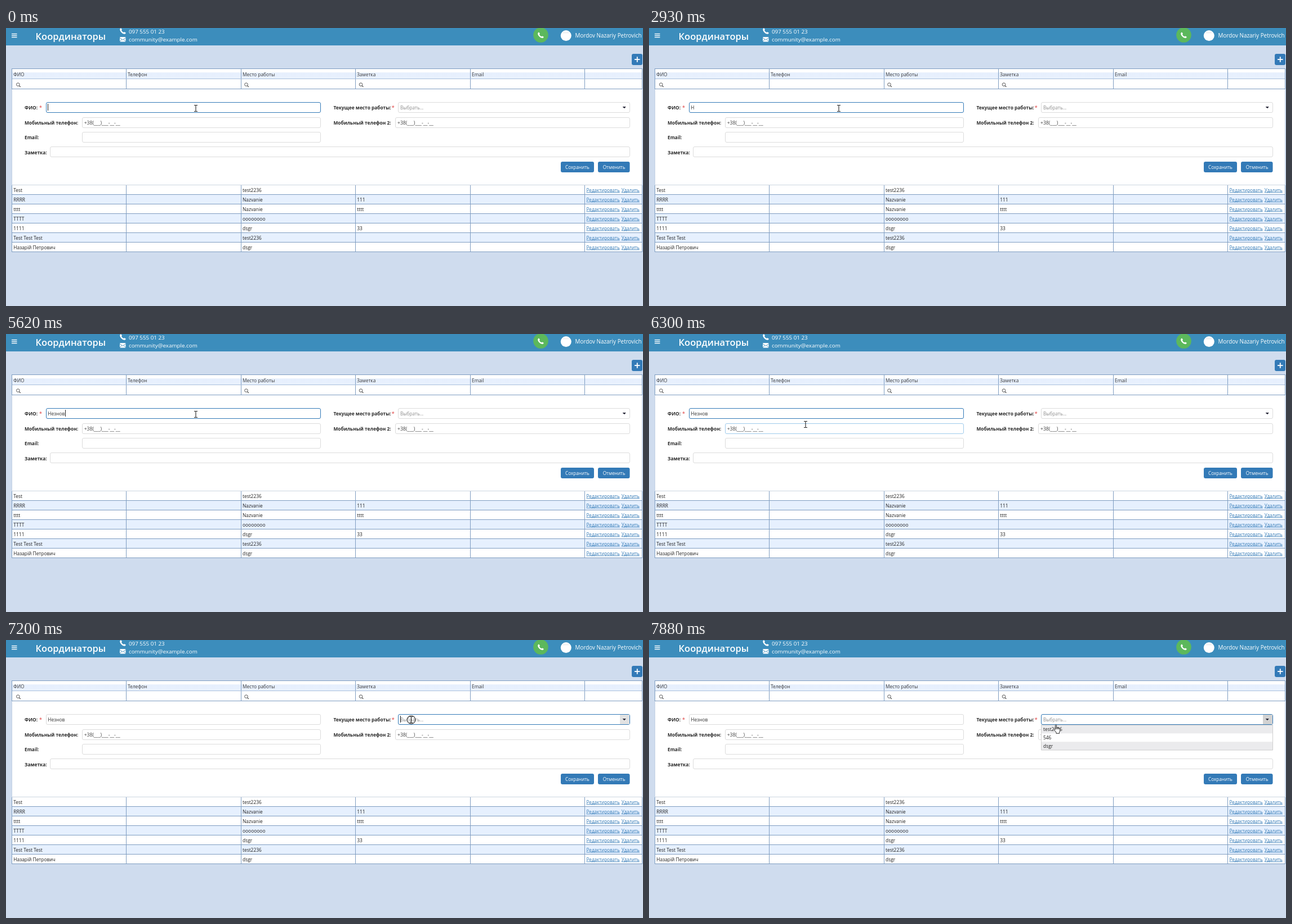
Animation, 1131 px wide and 495 px high, one loop 8 s. Source, as an HTML page:

```html
<!DOCTYPE html>
<html lang="ru">
<head>
<meta charset="utf-8">
<style>
html, body { margin: 0; width: 100%; height: 100%; overflow: hidden; background: #cfdcee; }
svg { display: block; width: 1131px; height: 495px; }
text { font-family: "Open Sans", "Noto Sans", sans-serif; white-space: pre; }
</style>
</head>
<body>
<svg id="stage" viewBox="0 0 1131 495">
  <defs>
    <linearGradient id="head" x2="0" y2="1">
      <stop offset=".3" stop-color="#fff"/><stop offset=".42" stop-color="#e6effd"/>
      <stop offset="1" stop-color="#e9f1fe"/>
    </linearGradient>
    <path id="phone" d="M2.2.3L4 3L2.9 4.2Q4 6.6 6.8 8L8 6.9L10.8 8.5Q10.5 10.8 8.3 10.8Q5 10.6 2.4 7.4Q-.4 4 .4 1.6Q.8.6 2.2.3Z" fill="#fff"/>
    <path id="beam" d="M-3-5.5H-.8L0-5L.8-5.5H3M0-5V5M-3 5.5H-.8L0 5L.8 5.5H3" fill="none" stroke="#222" stroke-width="1.1"/>
    <path id="hand" d="M3 1.5Q4 0 5 1.5V6.2Q6 5.3 7 6.4Q8 5.8 9 7Q10.4 6.4 11.2 8V11.5Q11 13 10 14.5V16.3H4.5V14.5L1 10.2Q-.2 8.6 1 8.2Q2 8 3 9.3ZM5 6V9M7 6.5V9M9 7V9" fill="#fff" stroke="#111" stroke-width=".9"/>
  </defs>
  <g id="page"></g>
  <g id="live"></g>
</svg>
<script>
const LINE = '#7f9dc1', BLUE = '#337ab7', HOVER = '#9fcbec', IDLE = '#dcdcdc';
const NAME = 'Незнов';
const COLS = [10.5, 213.5, 417.5, 620.5, 824.5, 1027.5, 1129.5];

const rect = (x, y, w, h, fill, more = '') =>
  `<rect x="${x}" y="${y}" width="${w}" height="${h}" fill="${fill}" ${more}/>`;
const text = (x, y, s, fill = '#222', size = 8.4, more = '') =>
  `<text x="${x}" y="${y}" fill="${fill}" font-size="${size}" ${more}>${s}</text>`;
const line = (x1, y1, x2, y2, color = LINE, w = 1) =>
  `<path d="M${x1} ${y1}L${x2} ${y2}" stroke="${color}" stroke-width="${w}"/>`;
const use = (id, x, y) => `<use href="#${id}" x="${x}" y="${y}"/>`;
const field = (x, y, right, color = IDLE) =>
  rect(x + .5, y + .5, right - x - 1, 18, '#fff', `rx="2.5" stroke="${color}"`);
const label = (y, s, x = 33) => text(x, y, s, '#2a2a2a', 8.35, 'font-weight="700"');
const star = x => text(x, 145, '*', '#d33', 9);
const button = (x, w, s, tx) =>
  rect(x, 238, w, 19, BLUE, 'rx="3"') + text(tx, 251, s, '#fff', 8.2);
const caret = x => rect(x, 135, 1, 12, '#222');

function topBar() {
  let s = rect(0, 0, 1131, 31, '#3c8dbc');
  for (const y of [10.5, 13.5, 16.5]) s += line(10, y, 19.5, y, '#fff', 1.4);
  s += text(52.5, 20.5, 'Координаторы', '#fff', 16.5, 'font-weight="600"');
  s += use('phone', 202, 0) + text(218, 9.7, '097 555 01 23', '#fff', 9.8);
  s += rect(202, 16, 10.5, 8.5, '#fff', 'rx="1"') +
    '<path d="M202 17.5L207.2 21.3L212.5 17.5M202 24L205.5 20.5M212.5 24L209 20.5" fill="none" stroke="#3c8dbc" stroke-width=".9"/>';
  s += text(218, 24, 'community@example.com', '#fff', 9.8);
  s += '<circle cx="949.5" cy="12.5" r="13.3" fill="#5cb85c"/>' + use('phone', 944, 7.3);
  s += '<circle cx="994.3" cy="13.6" r="9.5" fill="#fff"/>' + line(989, 8.5, 999, 8.5, '#ddd', .8);
  s += text(1010.5, 17.2, 'Mordov Nazariy Petrovich', '#fff', 9.9);
  return s + rect(1111, 46, 19, 20, BLUE, 'rx="3"') +
    line(1116, 56, 1125.5, 56, '#fff', 1.8) + line(1120.75, 51.2, 1120.75, 60.8, '#fff', 1.8);
}

function table() {
  let s = rect(10.5, 72.5, 1119, 326, '#fff') + rect(10.5, 73, 1119, 17, 'url(#head)');
  ['ФИО', 'Телефон', 'Место работы', 'Заметка', 'Email'].forEach((h, i) =>
    s += text(COLS[i] + 2.5, 85.5, h, '#3a3a3a'));
  for (const x of [21.3, 426.5, 630])
    s += `<circle cx="${x}" cy="100.6" r="2.8" fill="none" stroke="#555"/>` +
      line(x + 2, 102.6, x + 4.4, 105, '#555', 1.3);
  const rows = [
    ['Test', 'test2236', ''], ['RRRR', 'Nazvanie', '111'], ['tttt', 'Nazvanie', 'tttt'],
    ['TTTT', 'oooooooo', ''], ['1111', 'dsgr', '33'], ['Test Test Test', 'test2236', ''],
    ['Назарій Петрович', 'dsgr', '']
  ];
  rows.forEach(([name, place, note], i) => {
    const y = 279.5 + i * 17, base = y + 12;
    const link = 'text-decoration="underline"';
    if (i % 2) s += rect(11, y, 1119, 17, '#e6f0fe');
    s += text(13.3, base, name) + text(420, base, place) + text(623.3, base, note);
    s += text(1030.5, base, 'Редактировать', BLUE, 8.1, link) + text(1092.7, base, 'Удалить', BLUE, 8.1, link);
  });
  for (let i = 0; i < 8; i++)
    s += line(10, 279.5 + i * 17, 1130, 279.5 + i * 17, i ? LINE : '#ccd5e0');
  for (const x of COLS.slice(1, -1)) s += line(x, 73, x, 109) + line(x, 280, x, 398);
  for (const y of [72.5, 90.5, 108.5]) s += line(10, y, 1130, y, y === 90.5 ? '#a9bfdb' : LINE);
  for (const [a, b, c] of [[72, 109, LINE], [109, 280, '#c3d1e4'], [280, 399, LINE]])
    s += line(10.5, a, 10.5, b, c) + line(1129.5, a, 1129.5, b, c);
  return s;
}

function form() {
  return label(145, 'ФИО:') + star(59) + label(171.5, 'Мобильный телефон:') +
    label(198, 'Email:') + label(224.5, 'Заметка:') +
    label(145, 'Текущее место работы:', 581.5) + star(684.7) +
    label(171.5, 'Мобильный телефон 2:', 581.5) +
    field(135, 185, 559) + field(78, 211, 1108) +
    button(985, 59, 'Сохранить', 993) + button(1051, 56.5, 'Отменить', 1059.7);
}

// Each entry holds until the next one: start, x, y, shape
const MOVES = [
  [0, 337, 143, 'beam'], [5760, 300, 152, 'beam'], [5880, 268, 165, 'beam'],
  [6030, 266, 164, 'beam'], [6160, 264, 164, 'beam'], [6300, 278, 161, 'beam'],
  [6430, 345, 158, 'beam'], [6570, 480, 165, 'beam'], [6720, 620, 164, 'beam'],
  [6840, 686, 157, 'hand'], [6960, 706, 144, 'hand'], [7080, 719.5, 142, 'beam'],
  [7750, 717.5, 146, 'hand'], [7880, 718.5, 150, 'hand']
];
const KEYS = [2350, 3390, 3800, 3940, 4350, 4600];
const BLINKS = [150, 710, 1140, 1690, 2220, 2350, 2930, 3390, 5020, 5620, 6030, 6720, 7750];
const passed = (list, t) => list.filter(v => v <= t).length;
const within = (t, a, b) => t >= a && t < b;

function live(t) {
  const typed = passed(KEYS, t), caretOn = passed(BLINKS, t) % 2 === 0;
  const picked = t >= 7200, open = t >= 7350;
  const phoneHover = within(t, 5880, 6430) || within(t, 6570, 6720);
  const mask = '+38(___)___-__-__';

  let s = field(71, 132, 559, picked ? IDLE : BLUE) + text(74.3, 145, NAME.slice(0, typed), '#333');
  s += field(135, 159, 559, phoneHover ? HOVER : IDLE) + text(138.7, 171.5, mask, '#444', 8.6);
  s += field(691, 159, 1108) + text(695, 171.5, mask, '#444', 8.6);
  s += field(696, 132, 1108, picked ? BLUE : t >= 6960 ? HOVER : IDLE);
  s += text(700, 145, 'Выбрать...', '#8c8c8c', 8.2);
  if (picked) s += rect(1090, 133, 17, 17, open ? '#d2d2d2' : '#e2e2e2');
  s += '<path d="M1094.7 140H1100.9L1097.8 143.2Z" fill="#223"/>';
  if (open) {
    s += rect(696.5, 152, 411, 45, '#000', 'opacity=".1"') +
      rect(696.5, 151.5, 411, 44, '#fff', 'stroke="#cfcfcf"');
    ['test2236', '546', 'dsgr'].forEach((v, i) => {
      if (i !== 1) s += rect(697, 152 + i * 14.6, 410, 14.3, '#ebebed');
      s += text(700, 162 + i * 14.8, v);
    });
  }
  if (caretOn) s += caret(picked ? 700 : typed ? Math.round(80.6 + 4.9 * (typed - 1)) : 74);

  const [, x, y, shape] = MOVES[passed(MOVES.map(m => m[0]), t) - 1];
  if (within(t, 7200, 7350))
    s += `<circle cx="${x}" cy="${y}" r="7.3" fill="none" stroke="#333" stroke-width="1.1"/>`;
  return s + use(shape, x, y);
}

document.getElementById('page').innerHTML = topBar() + table() + form();
const layer = document.getElementById('live');
const start = performance.now();
let last = '';
function frame() {
  const next = live((performance.now() - start) % 8000);
  if (next !== last) layer.innerHTML = last = next;
  requestAnimationFrame(frame);
}
frame();
</script>
</body>
</html>
```
